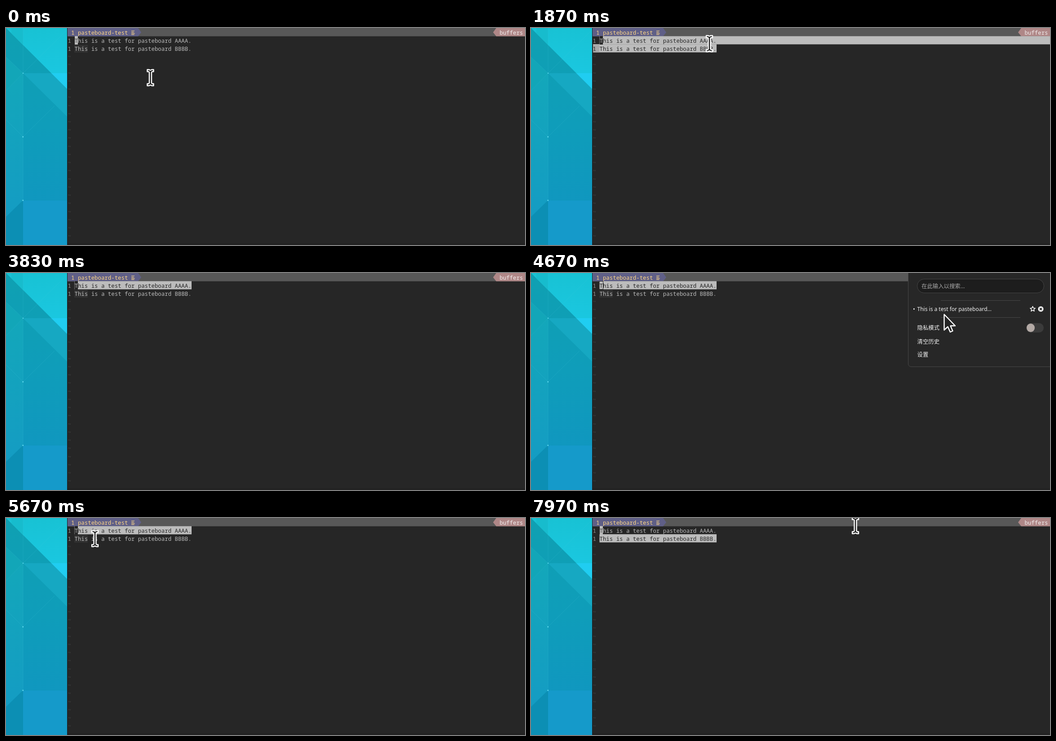
These frames come from a looping animation (1155 px wide and 485 px high, 8000 ms). An HTML page:

```html
<!DOCTYPE html>
<html lang="en">
<head>
<meta charset="utf-8">
<title>pasteboard-test</title>
<style>
  html, body { margin: 0; width: 100%; height: 100%; overflow: hidden; background: #262626; }
  #stage { position: relative; width: 1155px; height: 485px; overflow: hidden; background: #262626; }
  #stage * { box-sizing: border-box; }
  #stage > *, #menu > * { position: absolute; }
  .wall { left: 0; top: 0; }

  .row, .cell { font: 12.405px/18px "Noto Sans Mono", monospace; white-space: pre;
                height: 19px; padding-top: 1.5px; color: #bcbcbc; }
  .row { left: 137.6px; width: 1018px; }
  .row i { font-style: normal; color: #949494; }
  .row b { font-weight: normal; background: #313131; }
  .one { top: 18px; }
  .two { top: 36px; }
  .bar { left: 137px; top: 0; width: 1018px; height: 19px; background: #585858; clip-path: inset(0 0 .6px); }
  .tab { left: 137px; top: 0; width: 164px; height: 19px; background: #5f5f87;
         clip-path: polygon(0 0, 157px 0, 100% 9.8px, 157px 18.4px, 0 18.4px); }
  .mode { left: 1084px; top: 0; width: 71px; height: 19px; background: #af8787;
          clip-path: polygon(7px 0, 100% 0, 100% 18.4px, 7px 18.4px, 0 9.8px); }
  .name { top: 0; color: #ffd787; }
  .row.buffers { top: 0; left: 1098.5px; width: 57px; color: #f2eeee; }
  .row.tilde { color: #444; }
  .sel { background: #bcbcbc; color: #262626; }
  .sel i { color: #262626; background: #a8a8a8; }
  .cell { left: 152.5px; top: 18px; width: 7.44px; }
  .cell.block { background: #bcbcbc; color: #444; }
  .cell.dark { background: #262626; color: #bcbcbc; }
  .cell.hollow { left: 151px; width: 10px; color: transparent; border: 1px solid #262626; }
  .edge { left: 136px; top: 0; width: 1px; height: 485px; background: #1b1d1e; }
  .foot { left: 137px; top: 481px; width: 1018px; height: 4px; background: #222; }

  #menu { left: 839px; top: -10px; width: 330px; height: 220px; background: #272727;
          border: 1px solid #484848; border-radius: 7px;
          font: 12.4px/20px "Noto Sans", "Noto Sans CJK SC", "Noto Sans CJK", sans-serif; color: #f4f4f4; }
  #menu span { left: 19.5px; white-space: pre; }
  .search { left: 19px; top: 22px; width: 283px; height: 32px; border: 1px solid #464646;
            border-radius: 16px; background: #1d1d1d; }
  .rule { left: 72px; width: 177px; height: 1px; background: #484848; }
  .switch { left: 262px; top: 121px; width: 39px; height: 21px; border-radius: 11px; background: #3b3b3b; }
  .knob { left: 262.5px; top: 122px; width: 18.5px; height: 19px; border-radius: 50%; background: #b3a9a5; }
  .icons { left: 0; top: 0; }
  .pointer { left: 0; top: 0; overflow: visible; }
  .pointer path { fill: #242424; stroke: #fff; stroke-width: 2.4; stroke-linejoin: round; }
</style>
</head>
<body>
<div id="stage">
  <svg class="wall" width="136" height="485">
    <defs>
      <linearGradient id="base" x2="0" y2="1">
        <stop offset="0" stop-color="#0fa0b2"/><stop offset=".45" stop-color="#0f9dba"/><stop offset="1" stop-color="#1094c2"/>
      </linearGradient>
      <linearGradient id="lit" x2="0" y2="1">
        <stop offset="0" stop-color="#18c2d4"/><stop offset="1" stop-color="#1bc9e4"/>
      </linearGradient>
      <linearGradient id="side" x2="0" y2="1">
        <stop offset="0" stop-color="#13a7ba"/><stop offset="1" stop-color="#149cc3"/>
      </linearGradient>
    </defs>
    <path fill="url(#base)" d="M0 0H136V485H0z"/>
    <path fill="url(#side)" d="M0 140L38 101V385L0 422z"/>
    <path fill="#12a6b8" d="M0 65L38 101L0 140z"/>
    <path fill="#16a8c2" d="M38 101H101L136 136V198z"/>
    <path fill="url(#lit)" d="M0 0H136V136z"/>
    <path fill="#17bccd" d="M12 0H38V38L12 12z"/>
    <path fill="#20cdf1" d="M101 101H136V136z"/>
    <path fill="#159aca" d="M38 385.500H136V485H38z"/>
    <path fill="#0c8fb4" d="M38 385L0 422V485H38z"/>
    <path fill="none" stroke="#4cc9dc" stroke-opacity=".25" stroke-width=".8"
          d="M38 0V385M38 101L136 4M0 65L38 101L0 140M0 205L38 243L108 174"/>
    <path fill="#5fd8ee" d="M37 100h2v2h-2zM36.500 242h2.500v2.500h-2.500zM36.500 384h2.500v2.500h-2.500z"/>
  </svg>

  <div class="bar"></div>
  <div class="tab"></div>
  <div class="mode"></div>
  <div class="row name"> 1 pasteboard-test</div>
  <svg class="wall" width="300" height="18">
    <path stroke="#ffd787" stroke-width="1.100" d="M279 6.500h7M279 9.200h5.500M279 11.900h7.500M279 14.600h6.500"/>
  </svg>
  <div class="row buffers">buffers</div>

  <div class="row one"><i>1 </i>This is a test for pasteboard AAAA.</div>
  <div class="row two"><i>1 </i><b>This</b> is a test for pasteboard BBBB.</div>
  <div class="row one sel" id="selA"><i>1 </i>This is a test for pasteboard AAAA.</div>
  <div class="row two sel" id="selB"><i>1 </i>This is a test for pasteboard BBBB.</div>
  <div class="cell" id="caret">T</div>
  <div class="foot"></div>
  <div class="edge"></div>

  <div id="menu">
    <div class="search"></div>
    <span style="left:29px;top:29px;color:#a9a9a9">在此输入以搜索…</span>
    <div class="rule" style="top:70px"></div>
    <span style="left:10px;top:80px">•</span>
    <span style="top:80px;font-size:12px">This is a test for pasteboard…</span>
    <svg class="icons" width="316" height="110">
      <path fill="none" stroke="#fff" stroke-width="1.500" stroke-linejoin="round" id="star"/>
      <circle cx="294.500" cy="89.500" r="6" fill="#fff"/>
      <path stroke="#272727" stroke-width="1.800" d="M292 87l5 5M297 87l-5 5"/>
    </svg>
    <div class="rule" style="top:108px"></div>
    <span style="top:121.500px">隐私模式</span>
    <div class="switch"></div>
    <div class="knob"></div>
    <span style="top:153px">清空历史</span>
    <span style="top:182px">设置</span>
  </div>

  <svg class="pointer" id="beam" width="1" height="1">
    <path d="M-7 -18H-3L0 -16.500L3 -18H7V-13.500H4L2.500 -12V12L4 13.500H7V18H3L0 16.500L-3 18H-7V13.500H-4L-2.500 12V-12L-4 -13.500H-7z"/>
  </svg>
  <svg class="pointer" id="arrow" width="1" height="1">
    <path d="M1.500 2.500V37.500L9.500 30L15 42L20.500 39.500L15.500 28H26z"/>
  </svg>
</div>

<script>
  const LOOP = 8000, CELL = 7.443, LEFT = 137.6, ROW = 18.23;
  const LINE = "This is a test for pasteboard AAAA.";
  const $ = id => document.getElementById(id);

  // time, x, y of the pointer
  const path = [
    [370, 321.4, 111], [800, 173, 32], [1100, 173, 32], [1360, 285, 29], [1630, 396, 37],
    [1840, 397, 36], [1870, 397, 35], [1970, 398, 29], [2300, 398, 29], [2570, 548, 225],
    [2730, 548, 225], [2900, 290, 50], [3380, 972, 60], [3530, 908, 33], [3870, 1000, -48],
    [4170, 1000, -48], [4670, 918, 90], [4830, 918, 90], [5670, 198, 46], [5870, 178, 46],
    [6170, 178, 46], [6670, 350, 43], [6900, 392, 42], [7230, 392, 42], [7480, 540, 235],
    [7970, 722, 17]
  ];

  const clamp = v => Math.max(0, Math.min(1, v));
  const ramp = (t, a, b) => clamp((t - a) / (b - a));
  const within = (t, a, b) => t >= a && t < b;

  function pointerAt(t) {
    const n = path.findIndex(p => p[0] > t);
    if (n === 0) return path[0].slice(1);
    if (n < 0) return path[path.length - 1].slice(1);
    const [a, b] = [path[n - 1], path[n]];
    let k = ramp(t, a[0], b[0]);
    const dragging = within(t, 1100, 1970) || within(t, 6170, 6900);
    if (!dragging) k = k * k * (3 - 2 * k);
    return [a[1] + (b[1] - a[1]) * k, a[2] + (b[2] - a[2]) * k];
  }

  // selection grows by whole words
  function wordEnd(x) {
    const col = Math.max(0, Math.min(LINE.length - 1, Math.floor((x - LEFT) / CELL) - 2));
    if (LINE[col] === " ") return col + 3;
    const gap = LINE.indexOf(" ", col);
    return (gap < 0 ? LINE.length : gap) + 2;
  }

  function select(el, from, to) {
    el.style.visibility = to > from ? "visible" : "hidden";
    el.style.clipPath = `inset(.3px ${1018 - to * CELL}px .4px ${from * CELL}px)`;
  }

  function place(el, x, y, shown) {
    el.style.transform = `translate(${x}px, ${y}px)`;
    el.style.visibility = shown ? "visible" : "hidden";
  }

  function draw(now) {
    const t = now % LOOP;
    const [x, y] = pointerAt(t);
    const first = within(t, 1100, 6170);

    let a = [0, 0], b = [0, 0];
    if (first) {
      const [dx, dy] = pointerAt(Math.min(t, 1970));
      const end = wordEnd(dx);
      if (dy > 34) { a = [2, 1018 / CELL]; b = [0, end]; }
      else a = [2, end];
    } else if (t >= 6170) {
      b = [2, wordEnd(pointerAt(Math.min(t, 6900))[0])];
    }
    select($("selA"), ...a);
    select($("selB"), ...b);

    const blurred = within(t, 2540, 2800) || within(t, 4170, 5450) || within(t, 7460, 7740);
    $("caret").className = "cell " + (blurred ? "hollow" : first ? "dark" : "block");
    $("caret").style.borderColor = first ? "#262626" : "#bcbcbc";

    $("menu").style.opacity = ramp(t, 4140, 4300) * (1 - ramp(t, 5450, 5660));

    const arrow = within(t, 3700, 5450);
    place($("beam"), x, y, !arrow);
    place($("arrow"), x, y, arrow);
    requestAnimationFrame(() => draw(performance.now()));
  }

  for (let i = 3; i < 26; i++) {
    const el = document.createElement("div");
    el.className = "row tilde";
    el.textContent = "~";
    el.style.top = i * ROW + "px";
    $("selA").before(el);
  }

  $("star").setAttribute("d", "M" + Array.from({ length: 10 }, (_, i) => {
    const r = i % 2 ? 2.7 : 6, q = i * Math.PI / 5;
    return `${276.5 + r * Math.sin(q)} ${89.5 - r * Math.cos(q)}`;
  }).join("L") + "z");

  draw(performance.now());
</script>
</body>
</html>
```
